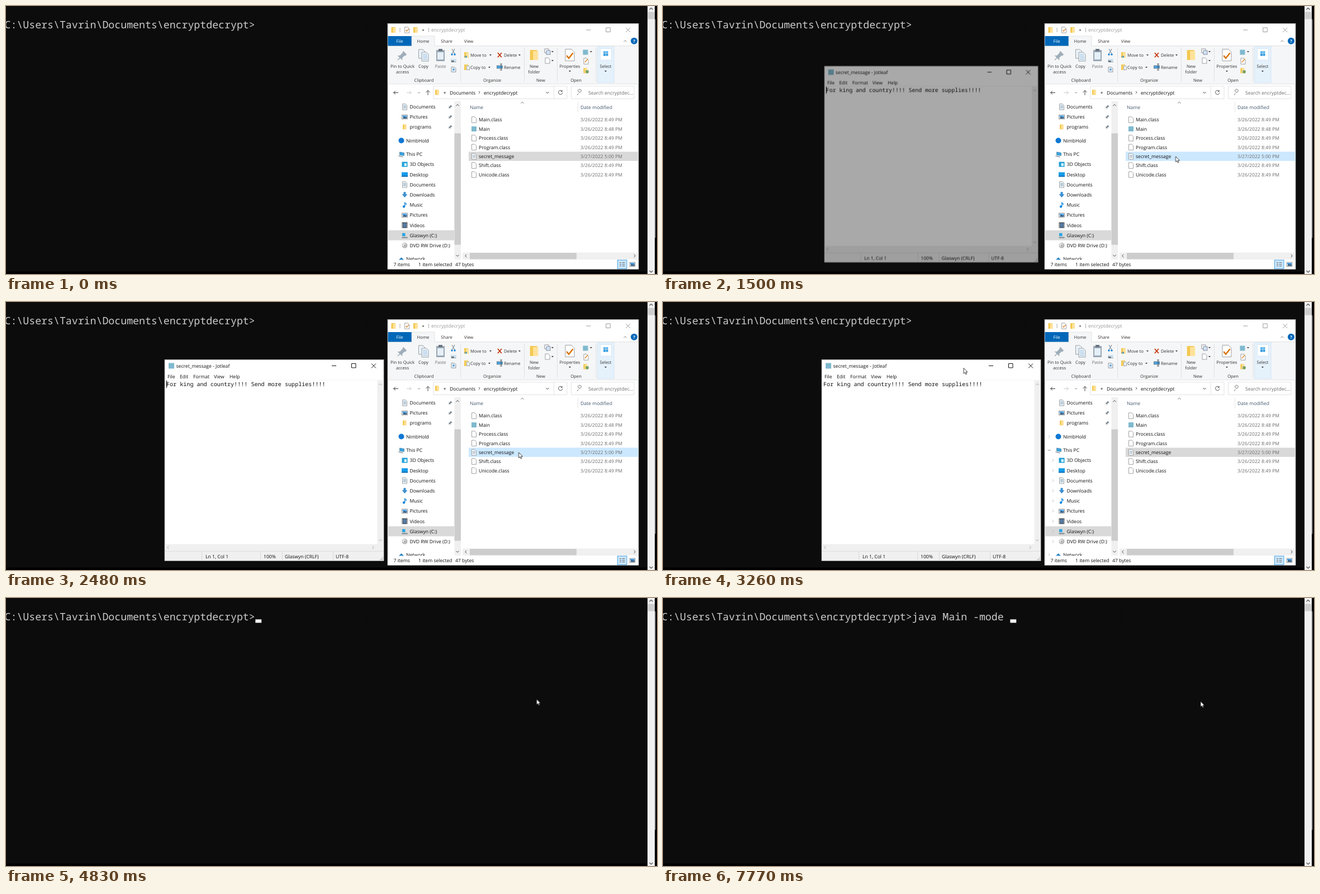
These frames come from a looping animation (1165 px wide and 481 px high, 8 s). An HTML page:

```html
<!DOCTYPE html>
<html lang="en">
<head>
<meta charset="utf-8">
<title>Terminal and file list</title>
<style>
html, body { margin: 0; width: 100%; height: 100%; overflow: hidden; background: #0c0c0c; }
svg { display: block; width: 1165px; height: 481px; }
text { font-family: "Open Sans", sans-serif; font-size: 8.6px; fill: #111; text-rendering: geometricPrecision; }
text.mono { font-family: "Noto Sans Mono", monospace; }
text.small { font-size: 7.7px; fill: #333; }
text.muted { fill: #6d6d6d; }
.mid { text-anchor: middle; }
#editor { transform-origin: 480px 284px; }
#caption text { fill: inherit; }
</style>
</head>
<body>
<svg id="stage" viewBox="0 0 1165 481">
  <rect width="1165" height="481" fill="#0c0c0c"/>
  <rect y="476.5" width="1165" height="5" fill="#000"/>
  <text class="mono" x="-2.5" y="40" style="font-size:18.23px;fill:#ccc">C:\Users\Tavrin\Documents\encryptdecrypt&gt;java Main -mode</text>
  <g id="typing">
    <rect x="446.3" y="20" width="200" height="27" fill="#0c0c0c"/>
    <rect id="caret" x="446.3" y="38.3" width="10.9" height="6.2" fill="#f2f2f2"/>
  </g>
  <rect x="1161" width="4" height="481" fill="#000"/>
  <rect x="1161" y="24" width="1.6" height="392" fill="#77777c"/>
  <rect x="1148" width="13" height="481" fill="#f0f0f0"/>
  <rect x="1148.5" y="10.5" width="12" height="13" fill="#cdcdcd"/>
  <path d="M1151.5 6.5l3-3 3 3M1151.5 475l3 3 3-3" fill="none" stroke="#505050" stroke-width="1.2"/>
  <g id="panes"><g id="explorer"></g><g id="editor"></g></g>
  <g id="mouse">
    <circle id="press" r="9" fill="#ff0" fill-opacity=".5"/>
    <path d="M0 0V9.8L2.3 7.8 3.9 11.3 5.5 10.6 4 7.2H7Z" fill="#fff" stroke="#111" stroke-width=".8"/>
  </g>
</svg>
<script>
const blue = '#1683d8', line = '#dcdcdc';

const rect = (x, y, w, h, fill, stroke = 'none') =>
  `<rect x="${x}" y="${y}" width="${w}" height="${h}" fill="${fill}" stroke="${stroke}" stroke-width=".8"/>`;
const path = (d, stroke = '#444', width = 1, fill = 'none') =>
  `<path d="${d}" fill="${fill}" stroke="${stroke}" stroke-width="${width}"/>`;
const text = (x, y, label, cls = '', style = '') =>
  `<text x="${x}" y="${y}" class="${cls}" style="${style}">${label}</text>`;
const circle = (x, y, r, fill) => `<circle cx="${x}" cy="${y}" r="${r}" fill="${fill}"/>`;

const chevron = (x, y, dir, stroke = '#444', s = 2.7) => path({
  up: `M${x - s} ${y + s / 2}l${s} ${-s} ${s} ${s}`,
  down: `M${x - s} ${y - s / 2}l${s} ${s} ${s} ${-s}`,
  left: `M${x + s / 2} ${y - s}l${-s} ${s} ${s} ${s}`,
  right: `M${x - s / 2} ${y - s}l${s} ${s} ${-s} ${s}`
}[dir], stroke);
const dropdown = (x, y) => path(`M${x - 2} ${y - 1}h4l-2 2.3z`, 'none', 0, '#333');

// Icons are centred on x, y.
const folder = (x, y, s = 1) =>
  rect(x - 4 * s, y - 5 * s, 7 * s, 10 * s, '#f3c84f') + rect(x - s, y - 4 * s, 5 * s, 9 * s, '#ffe29a');
const page = (x, y, fill = '#fff', w = 8, h = 10.5) =>
  path(`M${x - w / 2} ${y - h / 2}h${w * .68}l${w * .32} ${w * .32}v${h - w * .32}h${-w}z`, '#8b8b8b', .8, fill);
const lines = (x, y) => path(`M${x - 2.5} ${y - 2}h5m-5 2h5m-5 2h5`, '#6b8fa8', .8);
const notes = (x, y, s = 9) => rect(x - s / 2, y - s / 2, s, s, '#7fb9cf');
const pin = (x, y, s = 1, color = '#7b8790') =>
  path(`M${x + s} ${y - 4 * s}l${3 * s} ${3 * s}-${s} ${s}-${s} 0-${2 * s} ${2 * s} 0 ${2 * s}-${4 * s}-${4 * s} ${2 * s} 0 ${2 * s}-${2 * s}z`, color, .4, color)
  + path(`M${x - 1.5 * s} ${y + 1.5 * s}l${-2.5 * s} ${2.5 * s}`, color, s * .8);
const tick = (x, y, s = 1) => path(`M${x - 3 * s} ${y}l${2 * s} ${2.5 * s} ${4 * s}-${5 * s}`, '#d9730d', 1.3 * s);

const icons = {
  document: (x, y) => page(x, y, '#eef6fb') + lines(x, y),
  picture: (x, y) => rect(x - 5, y - 3.5, 10, 7.5, '#fff', '#888') + rect(x - 4, y - 2.5, 8, 3, '#4a9fe0')
    + path(`M${x - 4} ${y + 3}l3-4 2 2 3-1v3z`, 'none', 0, '#2f5579'),
  folder: (x, y) => folder(x, y, .85),
  cloud: (x, y) => circle(x, y, 5, '#0f78d4'),
  computer: (x, y) => path(`M${x - 3} ${y - 4}l8 1.5v5l-8-1z`, '#55798f', .7, '#35a6e6') + path(`M${x - 5} ${y + 3}l8 2`, '#8a9aa5', 1.5),
  cube: (x, y) => rect(x - 5, y - 4.5, 10, 9, '#1f9fd6') + rect(x - 1, y - 2, 4.5, 5, '#d5f2fc'),
  desktop: (x, y) => rect(x - 5.5, y - 4, 11, 8, '#159be8') + rect(x - 5.5, y + 2.3, 11, 1.7, '#0b66b0'),
  download: (x, y) => path(`M${x - 2} ${y - 5}h4v4h3l-5 6-5-6h3z`, 'none', 0, '#3b8fd0'),
  music: (x, y) => circle(x - 1.5, y + 3, 2.2, '#1688dc') + path(`M${x + .3} ${y + 3}v-8q0 3 3.5 4`, '#1688dc', 1.4),
  video: (x, y) => rect(x - 5, y - 5, 10, 10, '#333') + rect(x - 3, y - 4, 6, 8, '#547ba8') + path(`M${x - 4} ${y - 4}v9M${x + 4} ${y - 4}v9`, '#ddd', .8),
  drive: (x, y) => path(`M${x - 5} ${y + 4}h10`, '#7b868d', 2) + rect(x - 4.5, y - 4, 5.5, 5.5, '#28a3e3'),
  disc: (x, y) => circle(x, y, 5, '#b9b9b9') + circle(x - 1, y - 1, 3, '#e6e6e6') + circle(x, y, 1.2, '#888'),
  network: (x, y) => path(`M${x - 5} ${y + 2}l5-5 5 5v4h-10z`, 'none', 0, '#2f86c4')
};

const captionButtons = (x, y, stroke) => path(
  `M${x - 4} ${y}h8M${x + 31.5} ${y - 4}h7.5v7.5h-7.5zM${x + 67} ${y - 4}l8 8m0-8l-8 8`, stroke);

function explorer() {
  const nav = [
    [181, 'document', 'Documents', 'pinned'], [199, 'picture', 'Pictures', 'pinned'], [217, 'folder', 'programs', 'pinned'],
    [241.5, 'cloud', 'NimbHold', 'root'], [266, 'computer', 'This PC', 'open'],
    ...['cube,3D Objects', 'desktop,Desktop', 'document,Documents', 'download,Downloads', 'music,Music',
      'picture,Pictures', 'video,Videos', 'drive,Glaswyn (C:)', 'disc,DVD RW Drive (D:)']
      .map((item, i) => [284.2 + i * 18.2, ...item.split(',')]),
    [454, 'network', 'Network', 'root']
  ];
  let arrows = '';
  const navItems = nav.map(([y, icon, label, kind]) => {
    const open = kind === 'open', top = open || kind === 'root';
    if (kind !== 'pinned') arrows += chevron(top ? 691 : 698, y, open ? 'down' : 'right', open ? '#777' : '#bbb', 2.3);
    return icons[icon](top ? 707.5 : 713.5, y) + text(top ? 716 : 722.5, y + 3.2, label)
      + (kind === 'pinned' ? pin(795, y, .8) : '');
  }).join('');

  const files = ['Main.class', 'Main', 'Process.class', 'Program.class', 'secret_message', 'Shift.class', 'Unicode.class']
    .map((name, i) => {
      const y = 204.2 + i * 16.4;
      const icon = name === 'Main' ? notes(837.5, y) : page(837.5, y) + (i === 4 ? lines(837.5, y) : '');
      const stamp = i === 4 ? '3/27/2022 5:00 PM' : `3/26/2022 8:4${i === 1 ? 8 : 9} PM`;
      return icon + text(846, y + 3.2, name) + text(1028, y + 3.2, stamp, 'muted');
    }).join('');

  const ribbon = rect(683.5, 71, 448, 69, '#f5f6f7')
    + path('M683.5 71.5H726M767 71.5H1131.5M683.5 140H1131.5M813.5 75V136M927.5 75V136M986.5 75V136M1056 75V136', line, .8)
    + rect(683.5, 54, 42.5, 17.5, '#0067b8') + path('M726 71.5V54H767V71.5', line, .8, '#f5f6f7')
    + text(704.5, 66, 'File', 'small mid', 'fill:#fff')
    + [[746.5, 'Home'], [788.5, 'Share'], [828, 'View']].map(([x, s]) => text(x, 66, s, 'small mid')).join('')
    + chevron(1108, 63, 'up', '#888') + circle(1124, 62.7, 6, '#0067b8') + text(1124, 65.8, '?', 'small mid', 'fill:#fff;font-weight:700')
    + rect(1058.5, 73, 29.5, 64.5, '#e5f1fb', '#cce4f7')
    + [[709.5, 111, 'Pin to Quick'], [709.5, 121, 'access'], [747, 111, 'Copy'], [777.5, 111, 'Paste', 'muted'],
       [945, 111, 'New'], [945, 121, 'folder'], [1009, 111, 'Properties'], [1073, 111, 'Select'],
       [748, 136, 'Clipboard'], [870, 136, 'Organize'], [957, 136, 'New'], [1020, 136, 'Open']]
      .map(([x, y, s, cls = '']) => text(x, y, s, 'small mid ' + cls)).join('')
    + pin(709, 89, 2, '#9fadb8')
    + page(744, 86, '#eaf3fb', 11, 16) + page(750, 91, '#eaf3fb', 12, 16) + path('M746 87h7m-7 3h8m-8 3h8m-8 3h8', '#79a9d1', .8)
    + rect(770, 79, 15, 20, '#9aa7b3') + rect(774, 77, 7, 4, '#667481') + rect(772, 83, 11, 13, '#e5eff7')
    + path('M798 77l5 9m0-9l-5 9', '#5d7482') + circle(798, 87, 1.7, blue) + circle(803, 87, 1.7, blue)
    + rect(796, 95, 10, 6, '#cfe3f1') + text(801, 100.5, 'w..', 'small mid', 'font-size:6px;font-weight:700')
    + page(801, 114, '#e1ebf4', 8, 9) + path('M799 114h4m-2-2v4', blue)
    + folder(824, 88) + path('M820 91h5m-2-2l2 2-2 2', blue) + text(831, 91, 'Move to', 'small') + dropdown(867, 88)
    + folder(824, 110) + page(827, 111, '#eaf3fb', 5, 7) + text(831, 113, 'Copy to', 'small') + dropdown(865, 110)
    + path('M880 84l7 8m0-8l-7 8', '#c4320a', 1.8) + text(891, 91, 'Delete', 'small') + dropdown(919, 88)
    + rect(878.5, 107, 10, 5, '#4da3df', '#5d7482') + path('M886 104v11m-2-11h4m-4 11h4', '#333', .8) + text(891, 113, 'Rename', 'small')
    + folder(945, 88, 1.8)
    + rect(964, 77, 7, 7, '#fff', '#778') + rect(967, 80, 7, 7, '#cfe5f5', '#778') + dropdown(978, 82)
    + page(969, 98, '#fff', 8, 10) + dropdown(978, 98)
    + page(1009, 88, '#fff', 16, 21) + tick(1009, 89, 1.9) + dropdown(1009, 117)
    + notes(1037, 83) + dropdown(1047, 82) + page(1038, 99) + path('M1036 101l5-6', '#e09134', 1.5)
    + folder(1037, 116, .9) + circle(1040, 118, 3, '#7da36a')
    + rect(1063.5, 76.5, 20, 20.5, '#fff', '#cce4f7')
    + [1069, 1073.5].map(x => rect(x, 81, 4, 4, '#5eb5ee') + rect(x, 85.5, 4, 4, '#329add')).join('') + dropdown(1073, 117);

  const address = path('M702 155.5h-8.5m3.5-3l-3.5 3 3.5 3') + path('M717 155.5h8.5m-3.5-3l3.5 3-3.5 3', '#ccc')
    + chevron(739, 155.5, 'down', '#777', 1.8) + path('M755 160v-8.5m-3.5 3.5l3.5-3.5 3.5 3.5')
    + rect(765, 144, 239, 22.5, '#fff', line) + path('M980.5 144v22.5', line, .8) + rect(1011.5, 144, 112.5, 22.5, '#fff', line)
    + folder(771.5, 155, .9) + text(783, 158, '«') + text(794, 158.5, 'Documents') + chevron(847, 155, 'right', '#555', 2.2) + text(855, 158.5, 'encryptdecrypt')
    + chevron(969, 155.5, 'down') + path('M995 152.5a3.7 3.7 0 1 0 1 3m-.8-4.5v2.5h-2.5', '#444', .9)
    + path('M1028.5 154a2.8 2.8 0 1 0-.1 .1M1025 156.5l-3 3.5', '#666', .9) + text(1042, 158.5, 'Search encryptdec...', 'muted');

  const scrollbars = rect(802.5, 171, 11.5, 284, '#f0f0f0') + rect(802.5, 228.5, 11.5, 200, '#cdcdcd') + chevron(808, 178, 'up') + chevron(808, 448, 'down')
    + rect(817, 442.5, 314.5, 12.5, '#f0f0f0') + rect(830, 443, 191, 11.5, '#cdcdcd') + chevron(823, 448.5, 'left') + chevron(1125, 448.5, 'right');

  const caption = `<g id="caption">${text(761, 46, 'encryptdecrypt')}${captionButtons(1042.3, 43, 'currentColor')}</g>`;
  const quick = folder(693.5, 43) + path('M705 39v8M756.5 39v8', '#999', .8) + page(717.5, 43) + tick(718, 43, .9) + folder(733, 43) + dropdown(746.5, 43.5);

  return rect(683, 31.5, 449, 441, '#fff', '#b5b5b5') + quick + caption + ribbon + address
    + rect(684, 402.5, 118, 18, '#d9d9d9') + `<g id="arrows">${arrows}</g>` + navItems
    + rect(683.5, 455.5, 448, 16.5, '#fff') + scrollbars
    + text(830, 184.8, 'Name', '', 'fill:#43586f') + text(1028, 184.8, 'Date modified', '', 'fill:#43586f')
    + path('M1023.5 172v19', '#e5e5e5') + chevron(924, 173.5, 'up', '#777')
    + '<rect id="row" x="828" y="261.5" width="303.5" height="16.5"/>' + files
    + text(693.5, 467, '7 items') + text(738, 467, '1 item selected') + text(804, 467, '47 bytes')
    + rect(1094.5, 456, 16.5, 15.5, '#cce8ff', '#2692dc')
    + [460.5, 463.5, 466.5].map(y => path(`M1098 ${y}h3m1.5 0h5`, '#555', .9)).join('')
    + icons.picture(1121, 463.5);
}

function editor() {
  const menu = [[289, 'File'], [311, 'Edit'], [335, 'Format'], [372, 'View'], [400, 'Help']];
  const status = [[357, 'Ln 1, Col 1'], [461, '100%'], [499, 'Glaswyn (CRLF)'], [590, 'UTF-8']];
  return rect(284, 103.5, 392, 361, '#fff', '#aaa') + notes(296, 114.5, 10) + text(304.5, 118, 'secret_message - Jotleaf')
    + captionButtons(587, 114.5, '#111')
    + menu.map(([x, s]) => text(x, 137, s)).join('')
    + path('M284.5 140.3H676', '#eee', .6)
    + rect(664.5, 140.5, 11, 307, '#f0f0f0') + rect(284.5, 434.5, 391, 12.5, '#f0f0f0') + rect(284.5, 447.5, 391, 16.5, '#f0f0f0')
    + chevron(670, 148, 'up', '#aaa') + chevron(670, 427.5, 'down', '#aaa') + chevron(290, 440.5, 'left', '#aaa') + chevron(657, 440.5, 'right', '#aaa')
    + path('M284.5 447.3H676M350.5 448v16M455.5 448v16M494.5 448v16M585.5 448v16', '#d5d5d5', .8)
    + status.map(([x, s]) => text(x, 459.5, s)).join('')
    + path('M669 462.5h6M671.5 460h3.5M674 457.5h1', '#aaa', 1.2)
    + text(287, 151.2, 'For king and country!!!! Send more supplies!!!!', 'mono', 'font-size:10.1px')
    + '<rect id="textCaret" x="287" y="141" width="1" height="13" fill="#000"/>';
}

document.querySelector('#explorer').innerHTML = explorer();
document.querySelector('#editor').innerHTML = editor();

// Each track maps a time in ms to a value that holds until the next key.
const loop = 8000;
let css = '';
function track(id, keys, style) {
  const steps = Object.entries(keys)
    .map(([ms, value]) => `${Math.max(0, ms - 8) / loop * 100}%{${style(value)}}`).join('');
  css += `@keyframes ${id}{${steps}}#${id}{animation:${id} ${loop}ms step-end infinite}`;
}
const show = on => `opacity:${on}`;
const shift = ([x, y]) => `transform:translate(${x}px,${y}px)`;

function glide(start, end, from, to, count) {
  const keys = {};
  for (let i = 1; i <= count; i++) {
    const p = i / count, ease = p * p * (3 - 2 * p);
    keys[Math.round(start + (end - start) * (i - 1) / (count - 1))] = from.map((v, k) => v + (to[k] - v) * ease);
  }
  return keys;
}

const below = [934, 490], file = [917.5, 270], title = [538, 118.5], edge = [534, 101], prompt = [517, 46];
track('mouse', {
  0: below,
  ...glide(150, 620, below, file, 8),
  ...glide(2880, 3255, file, title, 6),
  3330: edge,
  ...glide(3470, 3670, edge, prompt, 4),
  ...glide(4270, 4900, prompt, [962, 185.5], 10)
}, shift);
track('press', { 0: 0, 890: 1, 1100: 0, 1230: 1, 1360: 0, 3740: 1, 4010: 0 }, show);
track('row', { 0: '#d9d9d9', 550: '#cce8ff', 2880: '#d9d9d9' }, c => `fill:${c}`);
track('caption', { 0: '#999', 1030: '#000', 1430: '#999' }, c => `fill:${c};color:${c}`);
track('arrows', { 0: 0, 3030: 1 }, show);
track('panes', { 0: 1, 3880: 0 }, show);
track('editor', { 0: [0, .9], 1430: [.3, .94], 1490: [.65, .975], 1560: [.88, .99], 1620: [.96, .998], 1690: [1, 1] },
  ([opacity, scale]) => `opacity:${opacity};transform:scale(${scale})`);
track('textCaret', { 0: 1, 1950: 0, 2480: 1, 3010: 0 }, show);
track('typing', {
  0: 0, 5570: 1, 5700: 2, 5900: 3, 5970: 4, 6100: 5, 6360: 6, 6510: 7, 6780: 8, 6910: 10,
  7050: 11, 7240: 12, 7350: 13, 7440: 14, 7550: 15, 7770: 16
}, n => shift([n * 10.938, 0]));
track('caret', { 0: 0, 4440: 1, 4970: 0, 5500: 1, 6030: 0, 6100: 1, 6640: 0, 6780: 1, 7640: 0, 7770: 1 }, show);
document.head.appendChild(document.createElement('style')).textContent = css;
</script>
</body>
</html>
```
